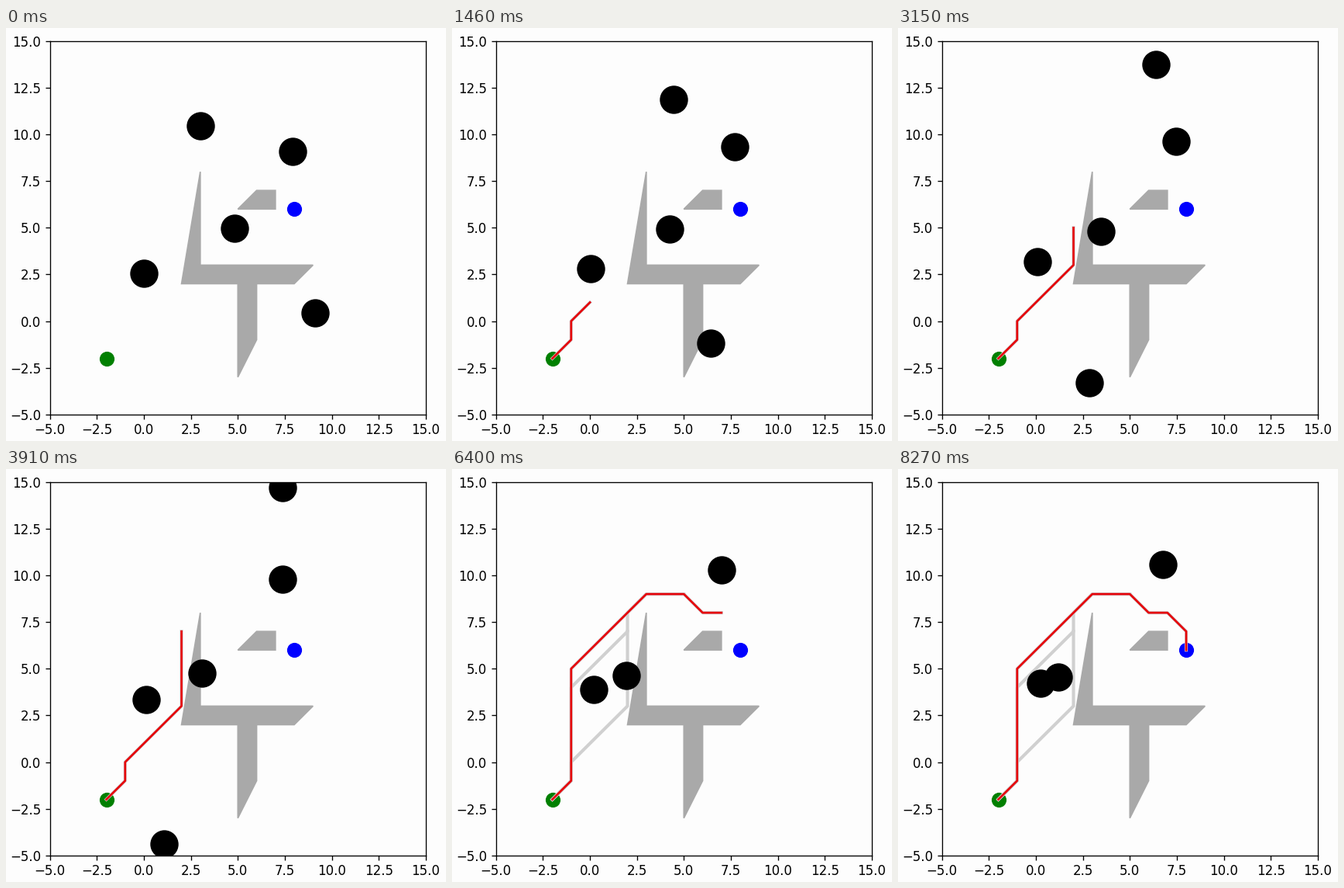
A matplotlib script for the animation above (8.76 s loop, 568 by 532 pixels).

```python
import numpy as np
import matplotlib.pyplot as plt
from matplotlib.animation import FuncAnimation
from matplotlib.patches import Polygon

W, H, DPI = 568, 532, 120
LOOP, STEP = 8760, 30
LAST_MOVE = 19
PAPER = "#fdfdfd"


def pt(px):
    return px * 72 / DPI


def walk(*corners):
    """Expand corner points into unit moves on the 8-connected grid."""
    cells = [np.array(corners[0])]
    for corner in corners[1:]:
        while (cells[-1] != corner).any():
            cells.append(cells[-1] + np.sign(corner - cells[-1]))
    return np.array(cells)


def route(h):
    """Climb to height h, cross diagonally to the wall, round its tip to the goal."""
    return walk((-2, -2), (-1, -1), (-1, h), (2, h + 3), (2, 8), (3, 9),
                (5, 9), (6, 8), (7, 8), (8, 7), (8, 6))


# Each plan: first move, its time in ms, ms per move, height of the diagonal
PLANS = [(1, 700, 365, 0), (10, 4210, 335, 4), (14, 5880, 440, 5)]
ROUTES = [route(h) for *_, h in PLANS]
FIRST = [first for first, *_ in PLANS] + [LAST_MOVE + 1]
MOVES = [ms + pace * n
         for (first, ms, pace, _), end in zip(PLANS, FIRST[1:])
         for n in range(end - first)]

# Drifting obstacles: first position and shift per move
START = np.array([(3.0, 10.46), (9.1, 0.45), (4.81, 4.98), (7.9, 9.08), (0.0, 2.56)])
SHIFT = np.array([(0.486, 0.471), (-0.894, -0.539), (-0.191, -0.023),
                  (-0.06, 0.08), (0.0135, 0.0875)])

WALLS = [
    [(2, 2), (3, 8), (3, 3), (9, 3), (8, 2), (6, 2), (6, -1), (5, -3), (5, 2)],
    [(5, 6), (6, 7), (7, 7), (7, 6)],
]

fig = plt.figure(figsize=((W + 0.01) / DPI, (H + 0.01) / DPI), dpi=DPI, facecolor=PAPER)
ax = fig.add_axes([56.8 / W, 34.2 / H, 485 / W, 481 / H], facecolor=PAPER)
ticks = np.linspace(-5, 15, 9)
ax.set(xlim=(-5, 15), ylim=(-5, 15), xticks=ticks, yticks=ticks)
for axis in (ax.xaxis, ax.yaxis):
    axis.set_major_formatter("{x:.1f}")

for wall in WALLS:
    ax.add_patch(Polygon(wall, color="darkgray", lw=1, zorder=1))


def dots(points, color, size, z):
    x, y = np.transpose(points)
    return ax.plot(x, y, "o", color=color, ms=pt(size), mew=0, zorder=z)[0]


dots([(-2, -2)], "green", 19.2, 2)
dots([(8, 6)], "blue", 19.2, 2)
trails = [ax.plot([], [], color="#d0d0d0", lw=pt(4.1), zorder=2.1)[0] for _ in PLANS]
path, = ax.plot([], [], color="#e60008", lw=pt(2.7), zorder=2.2)
discs = dots(START, "black", 36.4, 2.3)


def draw(i):
    k = int(np.searchsorted(MOVES, (i + 0.5) * STEP, side="right"))
    discs.set_data(*(START + k * SHIFT).T)
    path.set_data([], [])
    for trail, cells, first, end in zip(trails, ROUTES, FIRST, FIRST[1:]):
        done = cells[:min(k, end - 1) + 1] if k >= first else cells[:0]
        trail.set_data(*done.T)
        if len(done):
            path.set_data(*done.T)
    return [*trails, path, discs]


anim = FuncAnimation(fig, draw, frames=LOOP // STEP, interval=STEP,
                     repeat=True, repeat_delay=0, blit=False)
plt.show()
```
